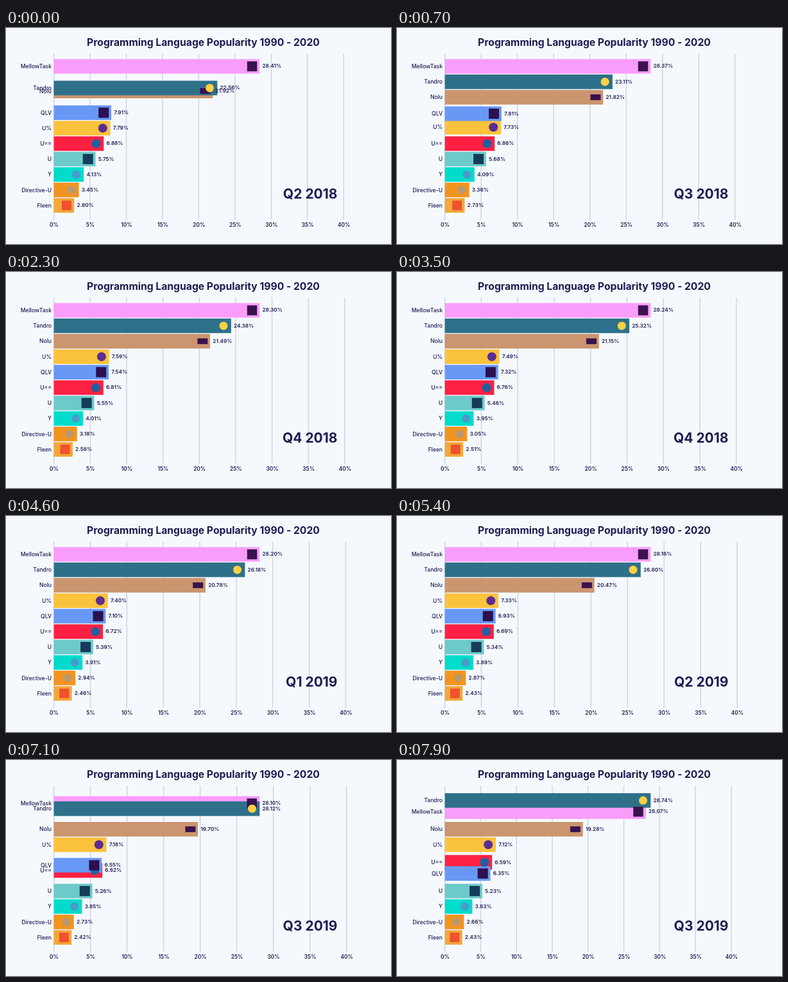
An HTML page with a canvas for the animation above (8 s loop, 600 px wide and 338 px high).

```html
<!DOCTYPE html>
<html lang="en">
<head>
<meta charset="utf-8">
<title>Programming Language Popularity</title>
<style>
  html, body { margin: 0; width: 100%; height: 100%; overflow: hidden; background: #f5f9fe; }
  canvas { display: block; width: 600px; height: 338px; }
</style>
</head>
<body>
<canvas id="stage"></canvas>
<script>
const W = 600, H = 338, LOOP = 8000, STEP = 100;
const QUARTER = 1500, LEAD = 895;      // length of a quarter, time already elapsed in the first
const SPAN = 6;                        // quarters covered by each curve
const LEFT = 74.6, FULL = 320.7;       // bar origin, length of the longest bar
const TOP = 60, ROW = 24.18, BAR = 22.8;
const INK = '#1f1b50';
const FONT = 'Inter, "Open Sans", sans-serif';

// Share at the start, middle and end; later entries are painted over earlier ones.
const langs = [
  { name: 'U', color: '#6ccaca', share: [5.84, 5.45, 5.22], icon: ['#163c59', 16, 16] },
  { name: 'U%', color: '#fbc23c', share: [7.87, 7.48, 7.1], icon: ['#5b2d91', 14] },
  { name: 'U==', color: '#fd2042', share: [6.91, 6.76, 6.58], icon: ['#21609f', 14] },
  { name: 'Nolu', color: '#cb956f', share: [22.02, 21.12, 19.17], icon: ['#3a124c', 16, 9] },
  { name: 'MellowTask', color: '#fa9dfa', share: [28.45, 28.24, 28.06], icon: ['#3a124c', 15.5, 15.5] },
  { name: 'Directive-U', color: '#f29420', share: [3.56, 3.04, 2.65], icon: ['#b59a73', 12] },
  { name: 'QLV', color: '#6898f5', share: [8.04, 7.3, 6.3], icon: ['#2c1050', 16, 16] },
  { name: 'Tandro', color: '#2e708a', share: [21.85, 25.4, 28.9], icon: ['#fbd043', 13] },
  { name: 'Y', color: '#00dccb', share: [4.18, 3.95, 3.83], icon: ['#4a9cc8', 13] },
  { name: 'Fleen', color: '#f2a83a', share: [2.91, 2.5, 2.43], icon: ['#f0512e', 15, 15] }
];

const canvas = document.getElementById('stage');
const ctx = canvas.getContext('2d');
const dpr = window.devicePixelRatio || 1;
canvas.width = W * dpr;
canvas.height = H * dpr;
ctx.scale(dpr, dpr);

// Parabola through the three shares, q in quarters.
function valueAt({ share: [a, m, b] }, q) {
  const u = q / SPAN;
  return a + (4 * m - 3 * a - b) * u + 2 * (a + b - 2 * m) * u * u;
}

const rankAt = (lang, q) =>
  langs.filter(o => valueAt(o, q) > valueAt(lang, q)).length;

// Places are fixed at each quarter and slide evenly in between.
function placeAt(lang, q) {
  const i = Math.floor(q);
  const from = rankAt(lang, i);
  return from + (rankAt(lang, i + 1) - from) * (q - i);
}

function text(str, x, midY, size, weight, align) {
  ctx.font = `${weight} ${size}px ${FONT}`;
  ctx.textAlign = align;
  ctx.fillStyle = INK;
  ctx.fillText(str, x, midY + size * 0.364);
}

function drawIcon([color, w, h], x, y) {
  ctx.fillStyle = color;
  if (h) {
    ctx.fillRect(x - w / 2, y - h / 2, w, h);
  } else {
    ctx.beginPath();
    ctx.arc(x, y, w / 2, 0, Math.PI * 2);
    ctx.fill();
  }
}

function drawAxis(scale) {
  for (let pct = 0; pct <= 40; pct += 5) {
    const x = LEFT + pct * scale;
    ctx.fillStyle = '#cfd9e1';
    ctx.fillRect(x - 0.8, 40, 1.6, 260);
    text(pct + '%', x + 0.4, 308.3, 8.3, 600, 'center');
  }
}

function draw(t) {
  const q = (t + LEAD) / QUARTER;
  const values = langs.map(l => valueAt(l, q));
  const scale = FULL / Math.max(...values);
  const bars = langs.map((lang, k) => ({
    ...lang,
    value: values[k],
    end: LEFT + values[k] * scale,
    y: TOP + placeAt(lang, q) * ROW
  }));

  ctx.fillStyle = '#f5f9fe';
  ctx.fillRect(0, 0, W, H);
  drawAxis(scale);

  for (const b of bars) {
    ctx.fillStyle = b.color;
    ctx.fillRect(LEFT, b.y - BAR / 2, b.end - LEFT, BAR);
  }
  for (const b of bars) drawIcon(b.icon, b.end - 11.8, b.y);
  for (const b of bars) {
    text(b.name, 71, b.y, 8.6, 500, 'right');
    text(b.value.toFixed(2) + '%', b.end + 4.2, b.y - 0.5, 8.2, 600, 'left');
  }

  const n = Math.floor(q) + 1;
  text('Programming Language Popularity 1990 - 2020', 307.5, 22.5, 15.7, 700, 'center');
  text(`Q${n % 4 + 1} ${2018 + Math.floor(n / 4)}`, 516.5, 259.5, 21, 700, 'right');
}

function tick() {
  const t = performance.now() % LOOP;
  draw(Math.floor(t / STEP) * STEP);
  requestAnimationFrame(tick);
}
tick();
</script>
</body>
</html>
```
